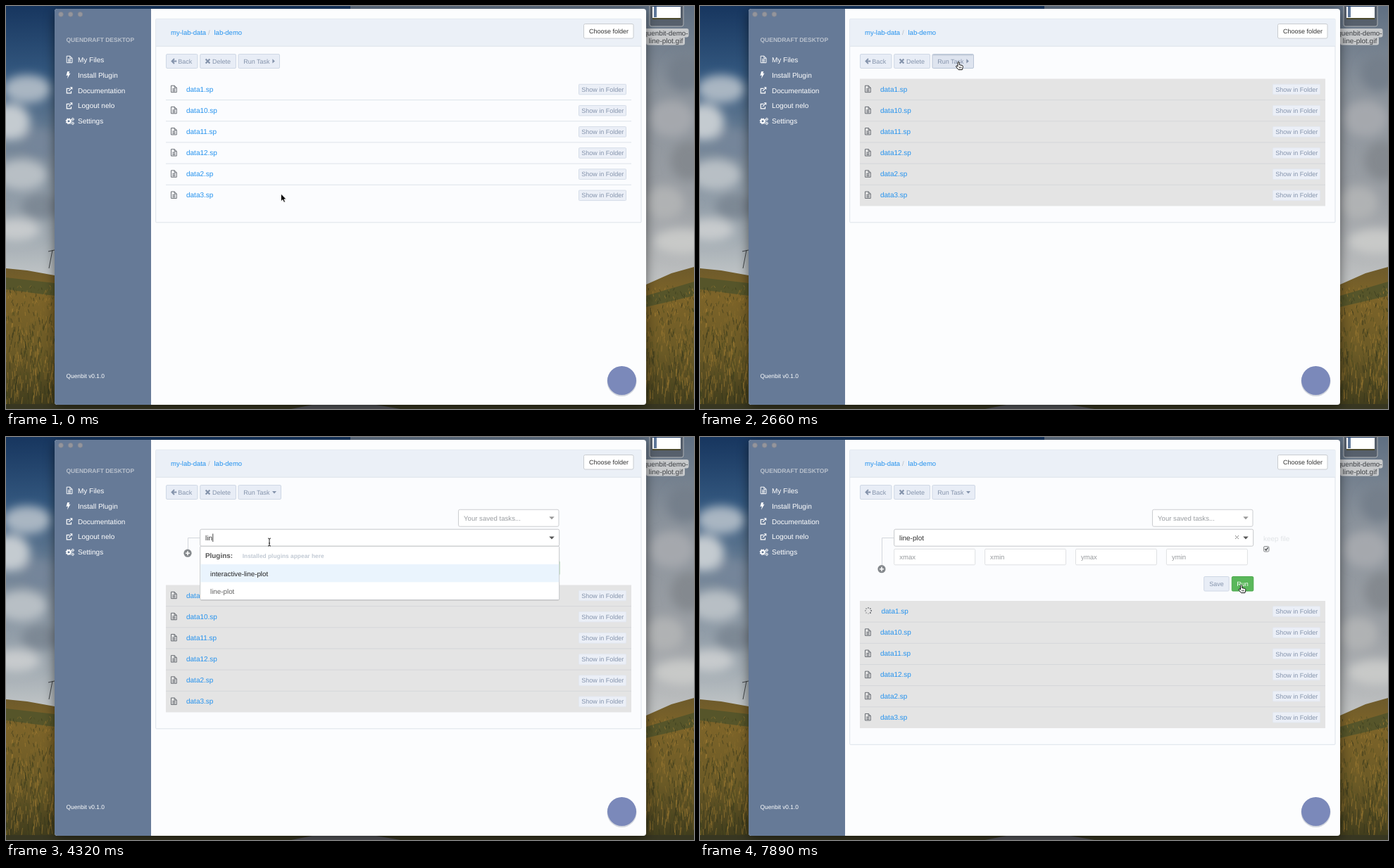
An HTML page that plays this animation: 977 px wide and 573 px high, repeating every 8 s.

```html
<!DOCTYPE html>
<html lang="en">
<head>
<meta charset="utf-8">
<title>File task runner</title>
<style>
html, body { margin: 0; width: 100%; height: 100%; overflow: hidden; background: #3c3a26; }
svg { display: block; width: 100vw; height: 100vh; }
text { font-family: "Liberation Sans", Arial, sans-serif; text-rendering: geometricPrecision; white-space: pre; }
</style>
</head>
<body>
<svg viewBox="0 0 977 573" preserveAspectRatio="none">
  <defs>
    <linearGradient id="skyL" x2="0" y2="1">
      <stop offset="0" stop-color="#17365f"/><stop offset=".25" stop-color="#34587f"/>
      <stop offset=".55" stop-color="#7c8b9b"/><stop offset=".85" stop-color="#a3acb3"/>
      <stop offset="1" stop-color="#c3c7c8"/>
    </linearGradient>
    <linearGradient id="skyR" x2="0" y2="1">
      <stop offset="0" stop-color="#5f6f82"/><stop offset=".3" stop-color="#8a929b"/>
      <stop offset=".7" stop-color="#9b9fa4"/><stop offset="1" stop-color="#c2c4c4"/>
    </linearGradient>
    <linearGradient id="land" x2="0" y2="1">
      <stop offset="0" stop-color="#6d5a2b"/><stop offset=".2" stop-color="#7d6429"/>
      <stop offset=".6" stop-color="#6b5a26"/><stop offset="1" stop-color="#3d3a1c"/>
    </linearGradient>
    <filter id="soft" x="-50%" y="-50%" width="200%" height="200%"><feGaussianBlur stdDeviation="7"/></filter>
    <filter id="shade" x="-10%" y="-10%" width="120%" height="120%"><feGaussianBlur stdDeviation="8"/></filter>
    <clipPath id="win"><rect x="69" y="4" width="840" height="563" rx="4"/></clipPath>
    <clipPath id="menu"><rect x="275" y="155" width="512" height="230"/></clipPath>
  </defs>
  <g id="desk"></g>
  <g id="app"></g>
</svg>
<script>
const $ = id => document.getElementById(id);
const BLUE = '#2492ee', MUTED = '#8493ab', LINE = '#dde3ea';

const text = (x, y, s, size = 10, fill = '#333', more = '') =>
  `<text x="${x}" y="${y}" font-size="${size}" fill="${fill}" ${more}>${s}</text>`;
const rect = (x, y, w, h, fill, more = '') =>
  `<rect x="${x}" y="${y}" width="${w}" height="${h}" fill="${fill}" ${more}/>`;
const path = (d, fill, more = '') => `<path d="${d}" fill="${fill}" ${more}/>`;
const box = (x, y, w, h, fill, stroke, rx = 1.5) => rect(x, y, w, h, fill, `stroke="${stroke}" rx="${rx}"`);
const at = (x, y, s) => `<g transform="translate(${x} ${y})">${s}</g>`;
const stroke = (c, w = 1) => `stroke="${c}" stroke-width="${w}"`;
const bold = 'font-weight="700"';

const fileIcon = (x, y, c) => at(x, y,
  path('M.5.5H5.2L8.3 3.5V10H.5ZM5.2.5V3.5H8.3M2.3 5H6.5M2.3 6.7H6.5M2.3 8.4H6.5', 'none', stroke(c, .95)));
const linkIcon = y => at(85.5, y,
  path('M5 2H.8V8.6H7V5.6M3.5 5.6 8 1', 'none', stroke('#fff', 1.2)) + path('M5.2 0H8.8V3.6Z', '#fff'));
const gear = (x, y, r) =>
  `<circle cx="${x}" cy="${y}" r="${r}" fill="none" ${stroke('#fff', r * .75)}/>` +
  `<circle cx="${x}" cy="${y}" r="${r * 1.5}" fill="none" ${stroke('#fff', r * .5)} stroke-dasharray="${r * .59}"/>`;

// ---- desktop behind the window
function desktop() {
  let seed = 7;
  const rnd = () => (seed = seed * 16807 % 2147483647) / 2147483647;
  const cloud = (x, y, rx, ry, c) => `<ellipse cx="${x}" cy="${y}" rx="${rx}" ry="${ry}" fill="${c}"/>`;
  let s = rect(0, 0, 489, 390, 'url(#skyL)') + rect(489, 0, 488, 400, 'url(#skyR)') + '<g filter="url(#soft)">' +
    cloud(30, 118, 34, 20, '#a9b6c2') + cloud(6, 165, 28, 26, '#c4cbd0') + cloud(48, 195, 26, 20, '#74859a') +
    cloud(22, 240, 36, 22, '#b8bfc5') + cloud(50, 285, 28, 18, '#7d8894') + cloud(14, 318, 34, 16, '#c7cbcd') +
    cloud(965, 95, 26, 26, '#747f8b') + cloud(945, 160, 32, 26, '#a5a8ad') + cloud(970, 220, 26, 28, '#84898f') +
    cloud(935, 280, 28, 24, '#b0b2b4') + cloud(960, 335, 40, 18, '#c8c9c8') + '</g>';
  s += path('M0 373 30 376 69 383 489 410 909 396 945 380 977 371V573H0Z', 'url(#land)');
  s += path('M0 386 69 394V412L0 403ZM909 412 977 392V412L909 428Z', '#56552a');
  const tones = ['#a98236', '#4b4a20', '#8a6c2c', '#2f321a'];
  for (const c of tones) {
    let d = '';
    for (let i = 0; i < 210; i++) {
      const x = rnd() * 69 + (i % 2 ? 0 : 908), y = 400 + rnd() * 172, h = 3 + (y - 400) / 16;
      d += `M${x.toFixed(1)} ${y.toFixed(1)}l${(rnd() * 4 - 2).toFixed(1)} ${-h.toFixed(1)}`;
    }
    s += path(d, 'none', stroke(c, .9) + ' opacity=".65"');
  }
  s += rect(0, 566, 977, 7, '#373621') + path('M405 573 440 566H520L560 573Z', '#55565a');
  s += path('M61 373 66 347M60 349 69 347', 'none', stroke('#35383b', .9));
  s += box(914, -6, 48, 35, 'rgba(70,75,82,.5)', '#aeb2b6', 3) + rect(918, -2, 40, 21, '#fff') +
    rect(918, -2, 40, 3, '#243f66') + rect(920, 1, 4, 15, '#5f789b') + rect(918, 17, 40, 2, '#4d4a2d');
  s += rect(900, 32, 69.5, 12.5, '#c7c9cb', 'rx="3"') + rect(909, 43, 55, 12.5, '#c7c9cb', 'rx="3"') +
    text(937, 42, 'quenbit-demo-', 9.8, '#3c3f43', 'text-anchor="middle"') +
    text(937, 52.5, 'line-plot.gif', 10, '#3c3f43', 'text-anchor="middle"');
  return s + rect(69, 8, 840, 562, '#000', 'rx="5" opacity=".5" filter="url(#shade)"');
}

// ---- parts of the window that never change
function frame() {
  let s = '<g clip-path="url(#win)">' + rect(69, 4, 840, 563, '#fcfdfe') + rect(69, 4, 137, 563, '#667a97') + '</g>';
  for (const x of [78, 91.7, 105.4])
    s += `<circle cx="${x}" cy="11.8" r="3.4" fill="#94959c" ${stroke('#7f838e', .7)}/>`;
  s += text(85.5, 51.3, 'QUENDRAFT DESKTOP', 8.5, '#b9c1cd', bold);
  ['My Files', 'Install Plugin', 'Documentation', 'Logout nelo', 'Settings'].forEach((label, i) => {
    s += text(102, 79.6 + i * 21.95, label, 10, '#fff');
  });
  s += fileIcon(85.7, 70.7, '#fff') + path('M87.2 93H90.2L89.2 96 91.5 95.6 87 103.4 88 98.4 85.5 98.9Z', '#fff') +
    linkIcon(115.3) + linkIcon(137.3) + gear(89, 163.8, 2.5) + gear(94.8, 161, 1.3) + gear(94.8, 166.8, 1.3);
  s += text(85.5, 529, 'Quenbit v0.1.0', 8.4, '#fff');
  return s + '<circle cx="874.5" cy="534" r="21" fill="#56607d" opacity=".25"/>' +
    '<circle cx="874.5" cy="532.5" r="20.5" fill="#7b89ba"/>';
}

const button = (x, y, w, h, label, tx, down) =>
  box(x, y, w, h, down ? '#dee4ef' : '#e8edf6', down ? '#b9c5d6' : '#cfd8e5') +
  (down ? path(`M${x + 1} ${y + 1.2}h${w - 2}`, 'none', stroke('#c3ccda', 1.6)) : '') +
  text(tx, y + 13.4, label, 9, MUTED);

function header(t) {
  const open = t >= 2810, hover = t >= 2070 && !open;
  return rect(213, 18.5, 689, 38.5, '#ebf0f7') + path('M213 57.2H902', 'none', stroke(LINE)) +
    text(234, 41.2, 'my-lab-data', 9.5, BLUE) + text(287, 41.2, '/', 9.5, '#b6bcc4') +
    text(295.5, 41.2, 'lab-demo', 9.5, BLUE) +
    box(820.5, 25.5, 70.5, 20.5, '#fff', '#c9ccd0', 2) + text(828, 39.2, 'Choose folder', 9, '#333') +
    button(227.5, 68.5, 44.5, 20, 'Back', 244.2) + button(275.7, 68.5, 50.8, 20, 'Delete', 293) +
    button(330, 68.5, open ? 60.5 : 58.5, 20, 'Run Task', 337.2, hover && t >= 2520) +
    path('M242.3 78.5H236M239 75 235.5 78.5 239 82', 'none', stroke(MUTED, 1.8)) +
    path('M283.6 75.4 289.4 81.4M289.4 75.4 283.6 81.4', 'none', stroke(MUTED, 2.2)) +
    path(open ? 'M378 77H384L381 80.5Z' : 'M378.4 75.2V81.6L381.8 78.4Z', MUTED);
}

const files = [1, 10, 11, 12, 2, 3].map(n => `data${n}.sp`);

function spinner(y, t) {
  const turn = Math.floor((t - 7590) / 149);
  let s = '';
  for (let i = 0; i < 8; i++) {
    const a = (i + turn) * Math.PI / 4;
    s += `<circle cx="${239 + 4.1 * Math.cos(a)}" cy="${y + 4.1 * Math.sin(a)}" r=".95" fill="#4c5056" opacity="${.35 + i * .09}"/>`;
  }
  return s;
}

function fileRows(t, shift) {
  const first = t < 980 ? 6 : t < 1120 ? 5 : t < 1480 ? 4 : t < 1630 ? 2 : 0;
  return files.map((name, i) => {
    const top = 103.5 + shift + i * 30.15, mid = top + 14.8, on = i >= first, busy = !i && t >= 7590;
    return (on ? rect(227, top, 661, 30.2, '#e4e4e4') : '') +
      (i ? path(`M227 ${top}H888`, 'none', stroke(on ? '#d4d6d9' : LINE)) : '') +
      (busy ? spinner(mid - .8, t) : fileIcon(234, mid - 5.6, '#64686e')) +
      text(busy ? 257.5 : 256, mid + 3.2, name, 10, BLUE) +
      box(813.5, mid - 7, 67, 14.5, '#ebeff7', on ? '#e3e7ef' : '#d5dde8', 1) +
      text(817.2, mid + 3.4, 'Show in Folder', 9, MUTED);
  }).join('');
}

// ---- task form
const arrowDown = (y, c) => path(`M771.3 ${y}H778.7L775 ${y + 4}Z`, c);
const tasks = ['matlab', 'python', 'Rscript'];
const plugins = ['interactive-line-plot', 'line-plot', 'normalize', 'rebin', 'rescale'];

function taskForm(t, shift) {
  const chosen = t >= 5520, dy = shift - 129.5;
  let s = path(`M275 143.5H258.5V${182 + dy}`, 'none', stroke('#d3d7dc')) +
    `<circle cx="258" cy="${187.7 + dy}" r="5.6" fill="#85898d"/>` +
    path(`M255 ${187.7 + dy}h6m-3-3v6`, 'none', stroke('#fff', 1.6)) +
    box(642.5, 103.2, 142.5, 24, '#fff', '#cbcdd0', 2) +
    text(650, 118.6, 'Your saved tasks...', 9.65, '#9a9da1') + arrowDown(113.3, '#999') +
    button(715.7, 198.5 + dy, 35.5, 20.5, 'Save', 723.3) +
    box(755.3, 198.5 + dy, 30.5, 20.5, '#5ab75b', '#4aa84c') + text(762.3, 212 + dy, 'Run', 9, '#fff') +
    box(275.7, 131.2, 510, 24, '#fff', '#c6c8cb', 2) + arrowDown(141.5, '#555');
  if (chosen) {
    s += text(283, 146.6, 'line-plot') + path('M760 140 765 145M765 140 760 145', 'none', stroke('#888')) +
      text(800, 147.6, 'keep file', 10, '#e0e3e6') + box(800.5, 155.5, 7.5, 7.5, '#e9eaeb', '#8d9093') +
      path('M802.2 159.2 803.9 161 806.6 157', 'none', stroke('#44474b', 1.3));
    ['xmax', 'xmin', 'ymax', 'ymin'].forEach((label, i) => {
      const x = 275.7 + i * 128.9;
      s += box(x, 159.3, 115, 22.5, '#fff', '#dfe1e3') + text(x + 7.5, 174.2, label, 9.6, '#989b9e');
    });
  }
  return s;
}

function dropdown(t) {
  const typed = t < 3870 ? '' : t < 4320 ? 'l' : t < 4620 ? 'lin' : 'line';
  const filter = t < 4020 ? '' : typed, match = n => n.includes(filter);
  const group = (title, list) => list.some(match) ? [title, ...list.filter(match)] : [];
  const rows = [...group('Default', tasks), ...group('Plugins:', plugins)];
  const active = t >= 5070 ? 2 : 1, pitch = 25.4, height = Math.min(rows.length, 9) * pitch;
  let s = rect(275.7, 156.5, 510, height, '#000', 'opacity=".12" rx="2"') +
    box(275.7, 155.3, 510, height, '#fff', '#c6c8cb') + '<g clip-path="url(#menu)">';
  rows.slice(0, 9).forEach((name, i) => {
    const y = 155.6 + i * pitch, base = y + 16.6, title = /^[DP]/.test(name);
    if (i === active) s += rect(276.2, y, 509, pitch, t >= 5070 ? '#ebf1fc' : '#eaf4fd');
    s += title ? text(283, base, name, 9.9, '#555', bold)
      : text(290, base, name, 9.8, i === active ? '#222' : '#626262');
    if (name === 'Plugins:') s += text(335.7, base - .2, 'Installed plugins appear here', 8.4, '#c2cad4', bold);
  });
  s += '</g>' + (typed ? text(283, 146.6, typed) : text(283, 146.6, 'Select task...', 9.8, '#a0a2a5'));
  const caret = { '': 283.5, l: 285.8, lin: 293.8, line: 299.4 }[typed];
  return s + (t >= 3430 && t < 5220 ? path(`M${caret} 137.5V149`, 'none', stroke('#333', .9)) : '');
}

// ---- pointer: time, x, y
const moves = [
  [0, 390.5, 267], [450, 401, 269], [690, 395, 270], [980, 396, 259], [1120, 397, 233], [1270, 398, 199],
  [1480, 399, 118], [1630, 397, 36], [1780, 394, 64], [1930, 390, 94], [2070, 382, 84], [2220, 375, 81],
  [2370, 370, 80], [2520, 367, 79], [2810, 368, 82], [2960, 371, 118], [3140, 373, 138], [3290, 374, 149.5],
  [5670, 420, 160], [5820, 525, 180], [5970, 640, 200], [6110, 725, 214], [6260, 762, 211], [6400, 768.5, 210]
];
const shapes = {
  arrow: path('M0 0V10.8L2.5 8.5 4.2 12.2 6 11.4 4.4 7.8H7.6Z', '#000', stroke('#fff', .8)),
  beam: path('M-2-5.5Q0-5.5 0-4 0-5.5 2-5.5M0-4V4M-2 5.5Q0 5.5 0 4 0 5.5 2 5.5M-1 1.5H1', 'none', stroke('#222')),
  hand: path('M-1 1.2Q0-.4 1.2 1.2V4.6L5 5.4Q6.6 5.9 6.4 7.5L5.4 11.6H0L-3.4 7.4Q-3.5 5.7-2 6.2L-1 7.2ZM1.4 7.5V9.5M3.4 7.5V9.5', '#fff', stroke('#111', 1))
};

function pointer(t) {
  const [, x, y] = moves.findLast(m => m[0] <= t);
  const kind = (t >= 2070 && t < 2960) || t >= 6260 ? 'hand' : t >= 3140 && t < 5670 ? 'beam' : 'arrow';
  const band = t >= 980 && t < 1780
    ? rect(395, y, x - 395, 270 - y, 'none', stroke('#fff', .8) + ' stroke-dasharray="1 1"') : '';
  return band + at(x, y, shapes[kind]);
}

function scene(t) {
  const shift = t < 2810 ? 0 : t < 5520 ? 107 : 129.5;
  return box(212.7, 18.3, 689.3, 289.5 + shift, '#fbfcfe', LINE, 1) + header(t) + fileRows(t, shift) +
    (shift ? taskForm(t, shift) : '') + (t >= 3290 && t < 5520 ? dropdown(t) : '') +
    (shift && t < 3290 ? text(283, 146.6, 'Select task...', 9.8, '#a0a2a5') : '') + pointer(t);
}

$('desk').innerHTML = desktop() + frame();
let last = '';
const start = performance.now();
function tick() {
  const now = scene((performance.now() - start) % 8000);
  if (now !== last) $('app').innerHTML = last = now;
  requestAnimationFrame(tick);
}
tick();
</script>
</body>
</html>
```
